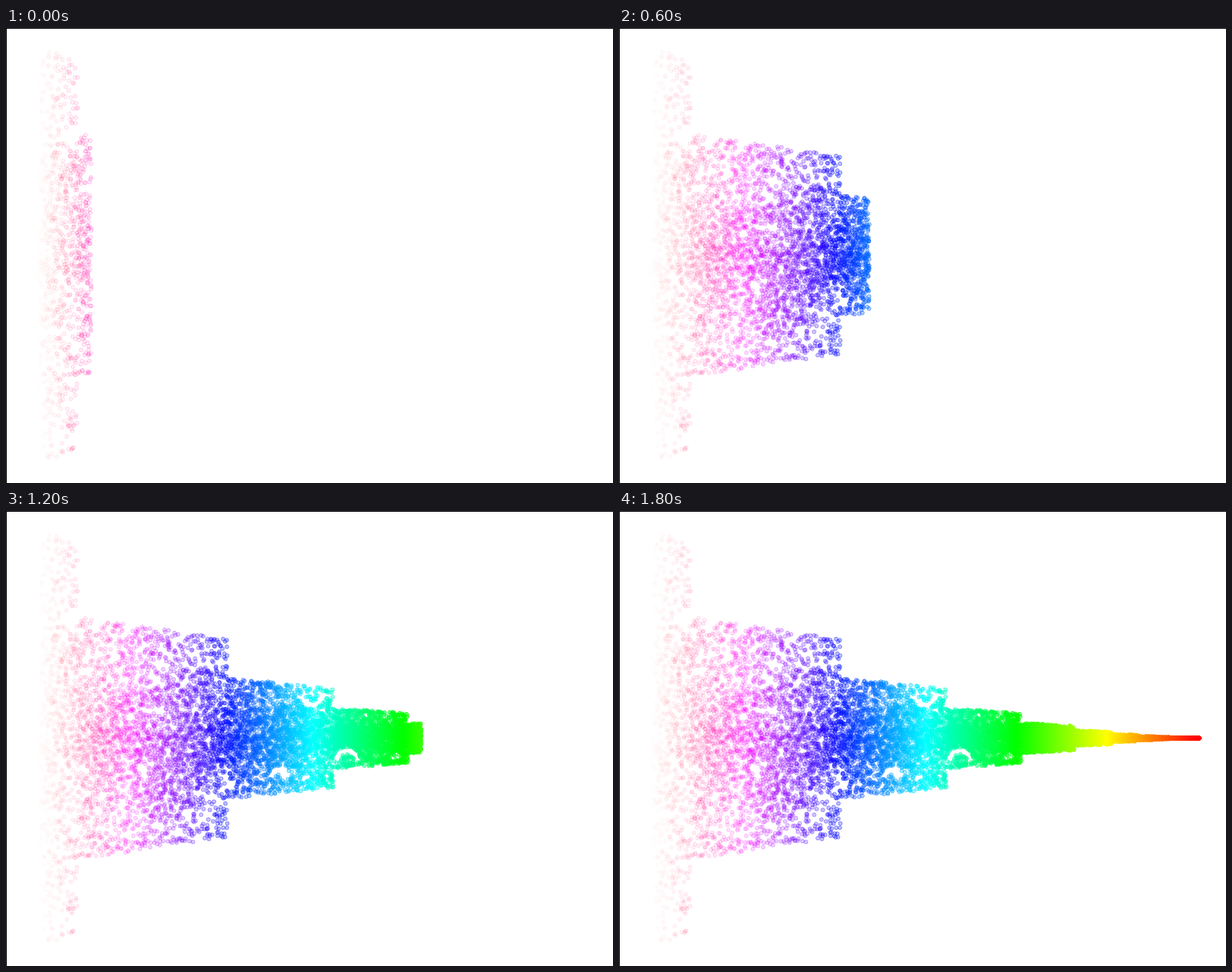
An HTML page with a canvas that plays this animation: 800 px wide and 600 px high, repeating every 2 s.

```html
<!DOCTYPE html>
<html lang="en">
<head>
<meta charset="utf-8">
<title>Converging points</title>
<style>
  html, body { margin: 0; width: 100%; height: 100%; overflow: hidden; background: #fff; }
  canvas { display: block; }
</style>
</head>
<body>
<canvas id="stage" width="800" height="600"></canvas>
<script>
const ctx = document.getElementById('stage').getContext('2d');
const STEPS = 10, STEP_MS = 200, PER_STEP = 1100;
const LEFT = 40, STEP_W = 72.5, MID = 299.5, TIP = 768;

// Small arched gaps in the cloud: x, y, radius
const GAPS = [[449, 330, 14], [360, 352, 11], [403, 243, 13]];

let seed = 20177;
function rand() {
  seed = (seed + 0x6D2B79F5) | 0;
  let t = Math.imul(seed ^ (seed >>> 15), 1 | seed);
  t = (t + Math.imul(t ^ (t >>> 7), 61 | t)) ^ t;
  return ((t ^ (t >>> 14)) >>> 0) / 4294967296;
}

// The spread halves at each step, and shrinks gently between steps.
function spread(x) {
  const d = TIP - x;
  const k = Math.floor(2 * Math.log2(673 / d));
  const start = 673 * 2 ** (-k / 2);
  return 160 * 2 ** -k * (d / start) ** 0.6;
}

// Only the half of each ring that faces the middle line is open.
const inGap = (x, y) => GAPS.some(([gx, gy, r]) =>
  (y - gy) * (MID - gy) > 0 && Math.abs(Math.hypot(x - gx, y - gy) - r) < 4.2);

// An even band with a broad, denser core
function offset() {
  const u = 2 * rand() - 1;
  return rand() < 0.68 ? u : 0.35 * (u + 2 * rand() - 1);
}

function makePoint(i) {
  const x = LEFT + STEP_W * i / PER_STEP;
  let y;
  do {
    y = MID + spread(x) * offset();
  } while (inGap(x, y));
  return { x, y };
}

const points = Array.from({ length: STEPS * PER_STEP }, (_, i) => makePoint(i));

function draw(step) {
  const edge = LEFT + STEP_W * (step + 1);
  const early = Math.max(0, 1 - step / 4);
  ctx.globalAlpha = 1;
  ctx.fillStyle = '#fff';
  ctx.fillRect(0, 0, 800, 600);
  ctx.lineWidth = 1;
  for (let i = 0; i < (step + 1) * PER_STEP; i++) {
    const { x, y } = points[i];
    const near = early * Math.max(0, 1 - (edge - x) / STEP_W);
    const hue = (765 - x) / 2 - 8 * near;
    const alpha = (x - LEFT) / 725;
    ctx.fillStyle = ctx.strokeStyle = `hsl(${hue.toFixed(1)}, 100%, 50%)`;
    ctx.beginPath();
    ctx.arc(x, y, 2.5, 0, 2 * Math.PI);
    ctx.globalAlpha = 0.75 * alpha;
    ctx.fill();
    ctx.globalAlpha = Math.min(1, 1.15 * alpha + 0.08 * near);
    ctx.stroke();
  }
  ctx.globalAlpha = 1;
  ctx.fillStyle = '#000';
  ctx.fillRect(0, 0, 800, 1);
  ctx.fillRect(0, 0, 1, 600);
}

let shown = -1;
const begin = performance.now();
function tick() {
  const step = Math.floor((performance.now() - begin) / STEP_MS) % STEPS;
  if (step !== shown) draw(shown = step);
  requestAnimationFrame(tick);
}
tick();
</script>
</body>
</html>
```
